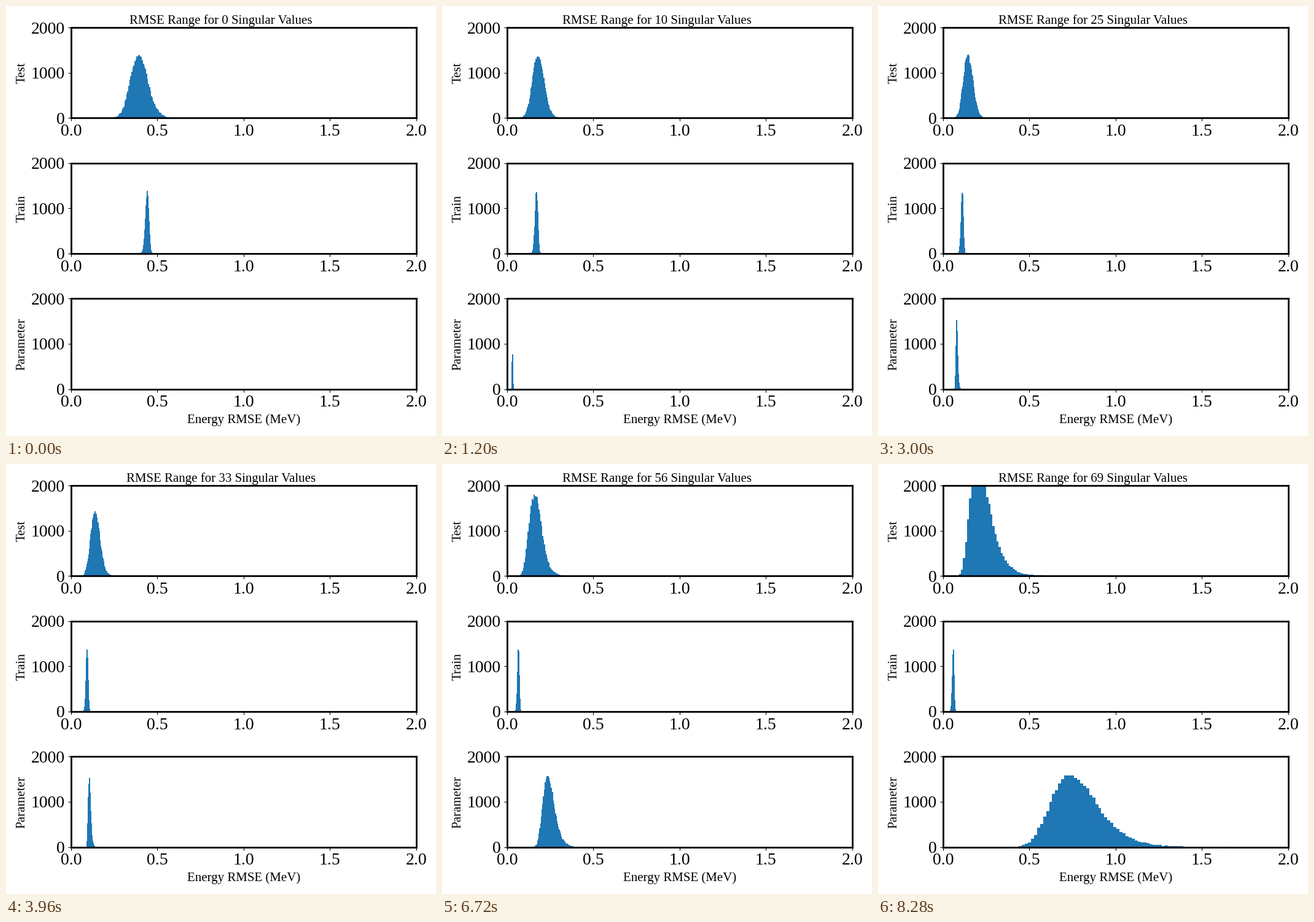
Animation, 700 px wide and 700 px high, one loop 8.4 s. Source, as a matplotlib script:

```python
import numpy as np
import matplotlib.pyplot as plt
from matplotlib.animation import FuncAnimation

plt.rcParams["font.family"] = "Liberation Serif"

SIZE = 700
LEFT, TOP, WIDTH, HEIGHT, PITCH = 105.8, 35.2, 562, 147.2, 220.6
FRAMES, INTERVAL = 70, 120
LAST = FRAMES - 1
SAMPLES = 30000
COLUMNS = np.arange(WIDTH) + 0.5


def decay(n, tau):
    return np.exp(-n / tau)


def growth(n, tau):
    return np.exp((n - LAST) / tau)


# Each rule gives the mode and spread (px), skew and peak count for n values.
def test_shape(n):
    t = n / LAST
    return (35 + 26 * decay(n, 16) + 49.5 * decay(n, 3) + 21.5 * t**4,
            7 + 7 * decay(n, 9) + 8.4 * t**5,
            0.07 + 0.28 * t**4,
            1380 + 1170 * t**5)


def train_shape(n):
    return (14.5 + 51 * decay(n, 23) + 59 * decay(n, 2.4),
            1.4 + 1.4 * decay(n, 20),
            -0.08,
            1380)


def parameter_shape(n):
    return (0.9 * n + 146 * growth(n, 5.9),
            0.05 * n + 34 * growth(n, 7.7),
            0.23,
            1550 * (1 - np.exp(-(n / 9) ** 2)))


PANELS = {"Test": test_shape, "Train": train_shape,
          "Parameter": parameter_shape}


def bell(x, mode, spread, skew, peak):
    """Shifted log-normal curve."""
    inner = np.maximum(1 + skew * (x - mode) / spread, 1e-9)
    return peak * np.exp(-0.5 * (np.log(inner) / skew) ** 2)


def bar_heights(shape, rng):
    """Histogram count seen in every pixel column of a panel."""
    mode, spread, _, peak = shape
    bin_width = max(2.55 * peak * spread / SAMPLES, 1e-3)
    index = np.floor((COLUMNS - mode) / bin_width).astype(int)
    counts = bell(mode + (index + 0.5) * bin_width, *shape)
    noise = rng.standard_normal(1009)[index % 1009]
    return np.clip(np.round(counts + 0.8 * np.sqrt(counts) * noise), 0, None)


fig = plt.figure(figsize=(7, 7), dpi=100, facecolor="white")
title = fig.suptitle("", fontsize=15, y=0.98)
edges = np.linspace(0, 2, WIDTH + 1)
bars = []

for row, label in enumerate(PANELS):
    bottom = SIZE - (TOP + row * PITCH + HEIGHT)
    ax = fig.add_axes([LEFT / SIZE, bottom / SIZE,
                       WIDTH / SIZE, HEIGHT / SIZE])
    bars.append(ax.stairs(np.zeros(WIDTH), edges, fill=True, color="C0",
                          linewidth=0, antialiased=False))
    ax.set(xlim=(0, 2), ylim=(0, 2000),
           xticks=np.arange(0, 2.1, 0.5), yticks=range(0, 2001, 1000))
    ax.xaxis.set_major_formatter("{x:.1f}")
    ax.tick_params(labelsize=20)
    ax.set_ylabel(label, fontsize=15)
    for spine in ax.spines.values():
        spine.set_linewidth(2)
ax.set_xlabel("Energy RMSE (MeV)", fontsize=15)


def update(n):
    title.set_text(f"RMSE Range for {n} Singular Values")
    rng = np.random.default_rng(n)
    for bar, shape in zip(bars, PANELS.values()):
        bar.set_data(values=bar_heights(shape(n), rng))
    return [title, *bars]


animation = FuncAnimation(fig, update, frames=FRAMES, interval=INTERVAL,
                          init_func=lambda: update(0), repeat=True,
                          repeat_delay=0)
plt.show()
```
